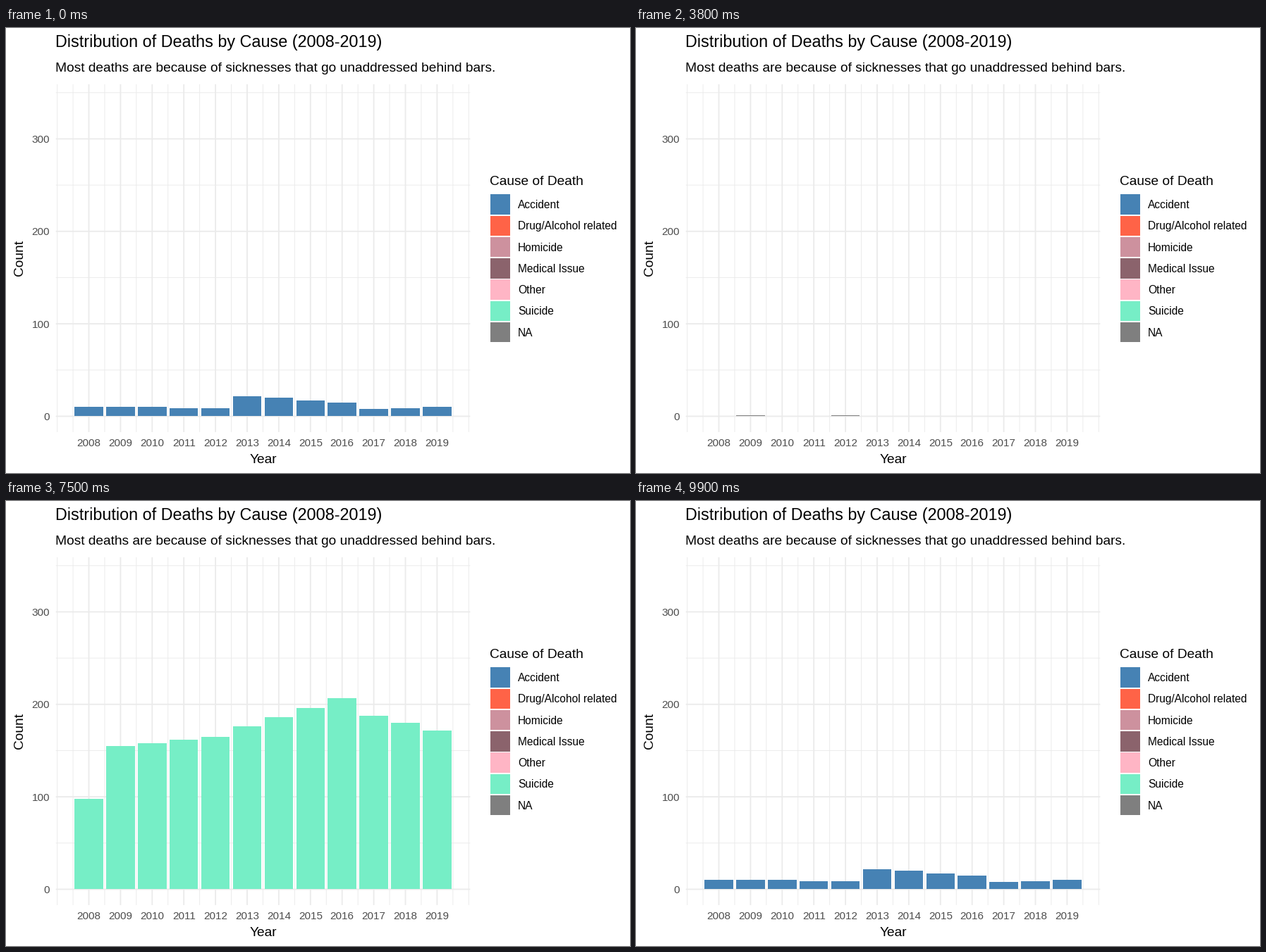
A matplotlib script for the animation above (10000 ms loop, 885 px wide and 632 px high).

```python
import matplotlib.pyplot as plt
import numpy as np
from matplotlib.animation import FuncAnimation
from matplotlib.patches import Rectangle

W, H, DPI = 885, 632, 128
PT = 72 / DPI  # points per pixel
plt.rcParams["font.family"] = "Liberation Sans"

YEARS = np.arange(2008, 2020)
# Each cause: colour and a few (years after 2008, count) points of its trend
CAUSES = {
    "Accident": ("#4682B4", [(0, 10), (4, 9), (5, 22), (8, 15), (9, 8), (11, 10)]),
    "Drug/Alcohol related": ("#FF6347", [(0, 28), (11, 93)]),
    "Homicide": ("#CD919E", [(0, 12), (9, 25), (11, 21)]),
    "Medical Issue": ("#8B636C", [(0, 278), (2, 320), (7, 342), (9, 331),
                                  (10, 305), (11, 309)]),
    "Other": ("#FFB5C5", [(0, 9), (3, 13), (4, 5), (9, 14), (10, 13), (11, 2)]),
    "Suicide": ("#76EEC6", [(0, 98), (1, 155), (4, 165), (8, 207), (9, 188), (11, 172)]),
    "NA": ("#7F7F7F", [(0, 0), (1, 1), (2, 0), (3, 0), (4, 1), (5, 0)]),
}
# (first tick, cause), one tick = 100 ms
SCHEDULE = [
    (0, "Accident"), (12, "Drug/Alcohol related"), (25, "Homicide"), (38, "NA"),
    (50, "Medical Issue"), (63, "Other"), (75, "Suicide"), (87, "NA"), (99, "Accident"),
]

LEFT, RIGHT, TOP, BOTTOM = 70.7, 658.4, 79.9, 573.9
YEAR_STEP, UNIT, ZERO = 44.9, 1.3133, 551.45


def year_x(year):
    return 117.5 + (year - 2008) * YEAR_STEP


def count_y(count):
    return ZERO - count * UNIT


def counts(cause):
    """Whole-number counts per year along the trend of a cause."""
    offsets, values = zip(*CAUSES[cause][1])
    return np.rint(np.interp(YEARS - 2008, offsets, values))


fig = plt.figure(figsize=(W / DPI, H / DPI), dpi=DPI, facecolor="white")
ax = fig.add_axes([0, 0, 1, 1])
ax.set_xlim(0, W)
ax.set_ylim(H, 0)
ax.axis("off")


def label(x, y, text, size, color="black", **kw):
    ax.text(x, y, text, fontsize=size * PT, color=color,
            **{"va": "baseline", "ha": "left", **kw})


def grid_line(xs, ys, width):
    ax.plot(xs, ys, color="#EBEBEB", lw=width * PT, solid_capstyle="butt",
            snap=False, zorder=1)


def set_edges(patch, left, top, right, bottom):
    """Place a rectangle on whole pixels so its edges stay crisp."""
    left, top, right, bottom = np.rint([left, top, right, bottom])
    patch.set_bounds(left, top, right - left, bottom - top)


def box(color, *edges):
    patch = ax.add_patch(Rectangle((0, 0), 0, 0, fc=color, lw=0, snap=False, zorder=3))
    set_edges(patch, *edges)
    return patch


# Grid
for year in np.arange(2007, 2020.5, 0.5):
    grid_line([year_x(year)] * 2, [TOP, BOTTOM], 1.85 if year in YEARS else 0.93)
for count in range(0, 351, 50):
    grid_line([LEFT, RIGHT], [count_y(count)] * 2, 0.93 if count % 100 else 1.85)

# Axes text
for year in YEARS:
    label(year_x(year), 594, str(year), 15.28, "#4D4D4D", ha="center")
for count in range(0, 301, 100):
    label(62.2, count_y(count) + 5.4, str(count), 15.28, "#4D4D4D", ha="right")
label(364.8, 617.5, "Year", 19.1, ha="center")
label(24.3, 326.5, "Count", 19.1, rotation=90, rotation_mode="anchor", ha="center")

# Titles
label(70.5, 27.3, "Distribution of Deaths by Cause (2008-2019)", 23.4)
label(70.5, 62, "Most deaths are because of sicknesses that go unaddressed behind bars.", 19.1)

# Legend
label(686.3, 223.3, "Cause of Death", 19.1)
for i, (cause, (color, _)) in enumerate(CAUSES.items()):
    cy = 250.6 + 30.27 * i
    box(color, 687, cy - 14.2, 715, cy + 14.2)
    label(726, cy + 5.4, cause, 15.5)

bars = [box("none", 0, 0, 0, 0) for _ in YEARS]


def update(tick):
    cause = [name for start, name in SCHEDULE if start <= tick][-1]
    half = 0.45 * YEAR_STEP
    for bar, year, count in zip(bars, YEARS, counts(cause)):
        x = year_x(year)
        set_edges(bar, x - half, count_y(count), x + half, ZERO)
        bar.set_facecolor(CAUSES[cause][0])
        bar.set_visible(count > 0)
    return bars


anim = FuncAnimation(fig, update, frames=100, interval=100, repeat=True,
                     repeat_delay=0, blit=False)
plt.show()
```
